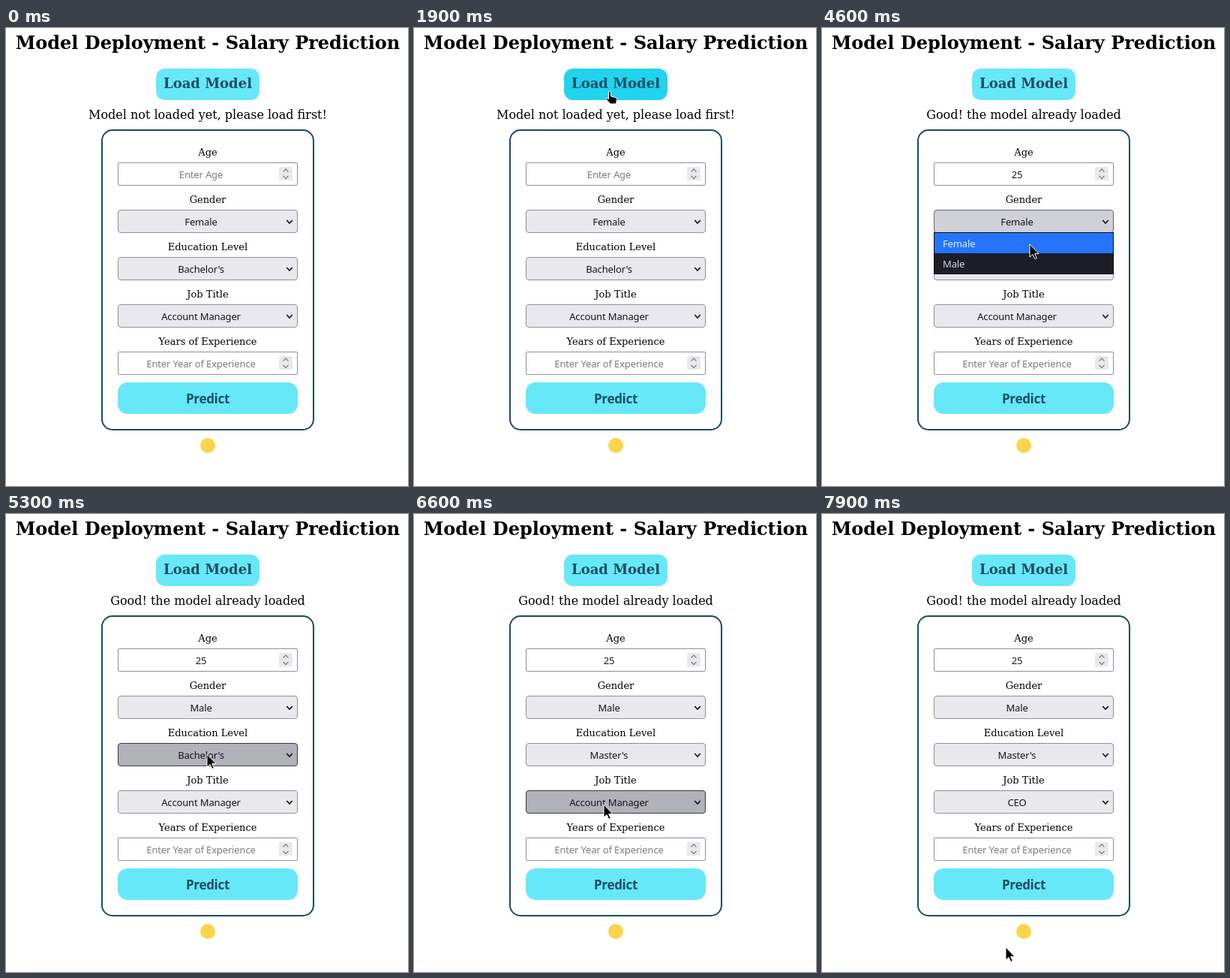
Recreate the animation shown at these times as an HTML page. Size 536 by 610 pixels, loop 8 s.

```html
<!DOCTYPE html>
<html lang="en">
<head>
<meta charset="utf-8">
<title>Salary Prediction</title>
<style>
html, body { margin: 0; width: 100%; height: 100%; overflow: hidden; background: #fff; }
svg { display: block; }
text { text-anchor: middle; font: 13px "Noto Sans", sans-serif; letter-spacing: -.15px; white-space: pre; }
.serif { font-family: "DejaVu Serif", serif; letter-spacing: 0; }
.item { text-anchor: start; }
</style>
</head>
<body>
<svg id="stage" width="536" height="610" viewBox="0 0 536 610"></svg>
<script>
const stage = document.getElementById('stage');
const LOOP = 8000, STEP = 100, ROW = 27;
const NAVY = '#164e63', CYAN = '#67e8f9', CYAN_HOVER = '#22d3ee';
const jobs = ['Account Manager', 'Accountant', 'Administrative Assistant', 'Business Analyst',
  'Business Development Manager', 'Business Intelligence Analyst', 'CEO', 'Chief Data Officer'];

// Each select: box top, options, times of press, opening and choice, chosen index
const selects = [
  { y: 242, items: ['Female', 'Male'], press: 4300, open: 4400, pick: 5000, choice: 1, width: 240 },
  { y: 305, items: ["Bachelor's", "Master's", 'PhD'], press: 5300, open: 5400, pick: 6000, choice: 1, width: 240 },
  { y: 368, items: jobs, press: 6500, open: 6800, pick: 7800, choice: 6, width: 272 }
];

// Pointer path: time, x, y
const path = [
  [1500, 261, 88], [1900, 261, 84], [2200, 261, 86], [2400, 264, 103], [2700, 270, 160],
  [2900, 273, 195], [4000, 273, 195], [4100, 278, 251], [4300, 278, 258], [4500, 277, 275],
  [4600, 277, 288], [4800, 277, 300], [4900, 277, 313], [5100, 276, 314], [5300, 268, 320],
  [5400, 266, 322], [5600, 258, 345], [5800, 250, 382], [6100, 250, 382], [6400, 253, 387],
  [6800, 253, 387], [7300, 248, 520], [7600, 245, 577], [8000, 245, 577]
];

function pointerAt(t) {
  if (t < path[0][0] || (t >= 3800 && t < 4100)) return null;
  const i = path.findIndex(p => p[0] > t);
  const [t0, x0, y0] = path[i - 1], [t1, x1, y1] = path[i];
  const k = (t - t0) / (t1 - t0);
  return { x: x0 + (x1 - x0) * k, y: y0 + (y1 - y0) * k };
}

const rect = (x, y, w, h, r, fill, stroke = 'none', sw = 1) =>
  `<rect x="${x}" y="${y}" width="${w}" height="${h}" rx="${r}" fill="${fill}" stroke="${stroke}" stroke-width="${sw}"/>`;
const text = (s, x, y, fill = '#15141a', attrs = '') => `<text x="${x}" y="${y}" fill="${fill}" ${attrs}>${s}</text>`;
const serif = (s, y, size, fill = '#000', weight = 400) =>
  text(s, 269, y, fill, `class="serif" style="font-size:${size}px;font-weight:${weight}"`);
const line = (d, stroke, sw) => `<path d="${d}" fill="none" stroke="${stroke}" stroke-width="${sw}"/>`;

function numberInput(y, value, hint, focused) {
  const box = focused
    ? rect(147, y - 2, 244, 35, 4, 'none', '#cfe4fa', 3) + rect(149, y, 240, 31, 2, '#fff', '#2b7bd3', 2)
    : rect(149.5, y + .5, 239, 30, 1.5, '#fff', '#8f8f9d');
  return box + text(value || hint, 260, y + 21, value ? '#15141a' : '#7b7b80')
    + rect(364, y + 6, 18, 18, 1, '#e9e9ed')
    + line(`M369.5 ${y + 12.5}l3.5-3.5 3.5 3.5M369.5 ${y + 18}l3.5 3.5 3.5-3.5`, '#85858c', 1.4);
}

function selectBox(s, t, p) {
  const pressed = t >= s.press && t < s.open;
  const opened = t >= s.open && t < s.pick;
  const blocked = selects.some(o => t >= o.open && t < o.pick);
  const hover = p && !blocked && p.y >= s.y && p.y < s.y + 31;
  const fill = pressed ? '#b1b1b9' : opened || hover ? '#d0d0d7' : '#e9e9ed';
  const stroke = pressed ? '#38383d' : opened || hover ? '#676774' : '#8f8f9d';
  return rect(149.5, s.y + .5, 239, 30, 3.5, fill, stroke)
    + text(s.items[t >= s.pick ? s.choice : 0], 260, s.y + 21)
    + line(`M374.2 ${s.y + 14}l3.8 4 3.8-4`, '#15141a', 1.7);
}

function popup(s, t, p) {
  if (t < s.open || t >= s.pick) return '';
  const top = s.y + 31;
  const active = Math.max(0, Math.floor((p.y - top) / ROW));
  return rect(149.5, top - .5, s.width - 1, s.items.length * ROW + 1, 0, '#1c1d27', '#0c0c12')
    + s.items.map((name, i) => {
      const y = top + i * ROW;
      return (i === active ? rect(150, y, s.width - 2, ROW, 0, '#2474ff') : '')
        + text(name, 161, y + 19, i === active ? '#e9eefc' : '#d6d6dc', 'class="item"');
    }).join('');
}

function cursor(p) {
  if (!p) return '';
  let shape;
  if (p.y < 96) {
    shape = '<path d="M-1.5 1q1.5-2 3 0v6l6 1.5q2.5 .8 2 3l-1 5.5h-8l-5-6q-.5-2 1.5-1.5l1.5 1.2z" fill="#000" stroke="#fff"/>';
  } else if (p.y > 179 && p.y < 210) {
    const beam = 'M-3-8H-1L0-7 1-8H3M0-7V7M-3 8H-1L0 7 1 8H3';
    shape = line(beam, '#fff', 3) + line(beam, '#000', 1.2);
  } else {
    shape = '<path d="M0 0V17L4 13.5 6.8 19.5 9.3 18.4 6.6 12.6H12z" fill="#000" stroke="#fff"/>';
  }
  return `<g transform="translate(${p.x} ${p.y})">${shape}</g>`;
}

function render(t) {
  const p = pointerAt(t);
  const focused = t >= 3000 && t < 4300;
  const age = t < 3500 ? '' : t < 4000 ? '2' : '25';
  const caretX = age ? 260.5 + age.length * 3.7 : 260.5;
  const labels = ['Age', 'Gender', 'Education Level', 'Job Title', 'Years of Experience'];
  stage.innerHTML =
    serif('Model Deployment - Salary Prediction', 28, 24, '#000', 700)
    + rect(200, 54, 138, 42, 12, p && p.y < 96 ? CYAN_HOVER : CYAN)
    + serif('Load Model', 80, 18, NAVY, 700)
    + serif(t < 2100 ? 'Model not loaded yet, please load first!' : 'Good! the model already loaded', 121, 16)
    + rect(128, 136, 282, 399, 14, '#fff', NAVY, 2)
    + labels.map((s, i) => serif(s, 170 + i * 63, 13)).join('')
    + numberInput(179, age, 'Enter Age', focused)
    + (focused ? line(`M${caretX} 187V203`, '#000', 1) : '')
    + numberInput(431, '', 'Enter Year of Experience', false)
    + selects.map(s => selectBox(s, t, p)).join('')
    + rect(149, 472, 240, 42, 13, CYAN)
    + text('Predict', 269, 500, NAVY, 'style="font-size:17px;font-weight:700;letter-spacing:-.3px"')
    + '<circle cx="269" cy="556" r="10" fill="#fcd34d"/>'
    + selects.map(s => popup(s, t, p)).join('')
    + cursor(p);
}

let shown = -1;
function tick() {
  const t = Math.floor(performance.now() % LOOP / STEP) * STEP;
  if (t !== shown) render(shown = t);
  requestAnimationFrame(tick);
}
tick();
</script>
</body>
</html>
```
